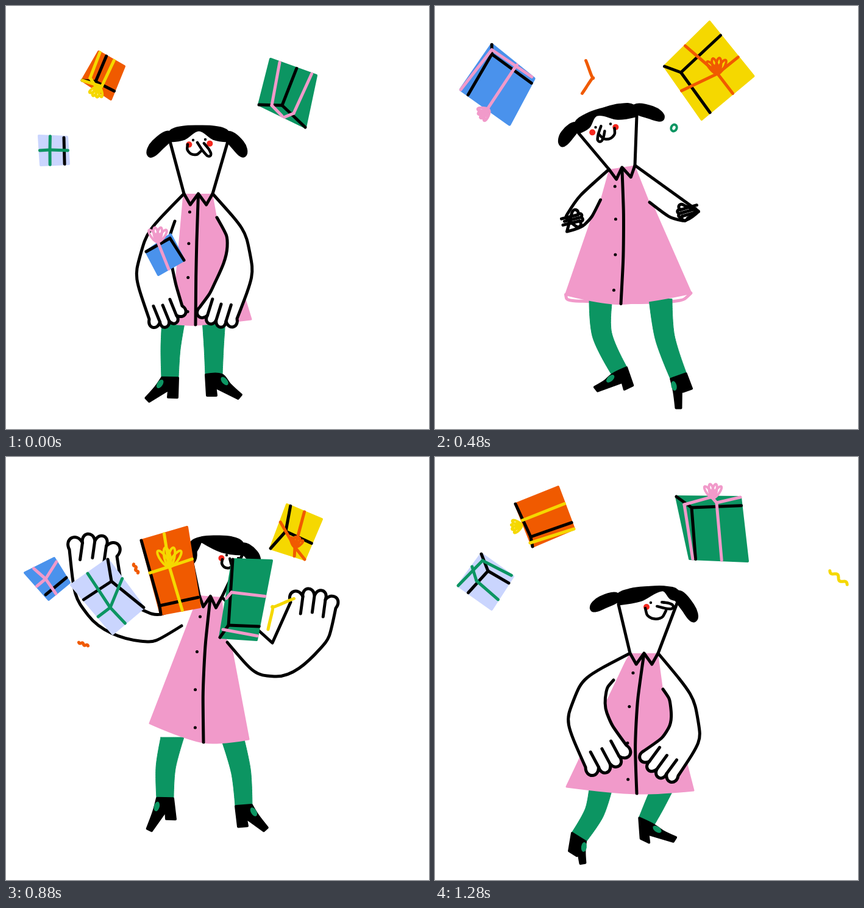
These frames come from a looping animation (694 by 694 pixels, 1360 ms). An HTML page with a canvas:

```html
<!DOCTYPE html>
<html lang="en">
<head>
<meta charset="utf-8">
<title>Juggling presents</title>
<style>
html, body { margin: 0; width: 100%; height: 100%; overflow: hidden; background: #fff; }
canvas { display: block; width: 100vw; height: 100vh; }
</style>
</head>
<body>
<canvas id="stage" width="694" height="694"></canvas>
<script>
const ctx = document.getElementById('stage').getContext('2d');
const LOOP = 1360, STEP = 80;
const BLACK = '#000', WHITE = '#fff', PINK = '#f19aca', GREEN = '#0c9562', BLUE = '#4a92ec';
const YELLOW = '#f5d800', ORANGE = '#f05a00', LILAC = '#cad5fe', RED = '#f5281e';
const SMOOTH = -2, SOFT = .4, STRAIGHT = 2;

// Points are [x, y] pairs.
const lerp = (a, b, u) => a + (b - a) * u;
const mix = (a, b, u) => a.map((v, i) => lerp(v, b[i], u));
const move = ([x, y], [dx, dy], k = 1) => [x + dx * k, y + dy * k];
const minus = (a, b) => [a[0] - b[0], a[1] - b[1]];
const dot = (a, b) => a[0] * b[0] + a[1] * b[1];
const unit = v => { const n = Math.hypot(...v) || 1; return [v[0] / n, v[1] / n]; };
const left = ([x, y]) => [-y, x];
const pairs = list => list.flatMap((v, i) => i % 2 ? [] : [[v, list[i + 1]]]);

// Appends a curve; turns sharper than `bend` (a cosine) stay corners.
function addCurve(path, p, bend, closed = false, joined = false) {
  const n = p.length, at = i => p[(i + n) % n];
  const isEnd = i => !closed && (i === 0 || i === n - 1);
  const heading = i => {
    if (isEnd(i)) return [0, 0];
    const u = unit(minus(at(i), at(i - 1))), v = unit(minus(at(i + 1), at(i)));
    return dot(u, v) < bend ? [0, 0] : unit(minus(at(i + 1), at(i - 1)));
  };
  if (joined) path.lineTo(...p[0]); else path.moveTo(...p[0]);
  for (let i = 0; i < n - (closed ? 0 : 1); i++) {
    const a = at(i), b = at(i + 1), j = (i + 1) % n;
    const reach = Math.hypot(...minus(b, a)) / 3;
    let c = move(a, heading(i), reach), d = move(b, heading(j), -reach);
    if (isEnd(i)) c = d;
    else if (isEnd(j)) d = c;
    path.bezierCurveTo(...c, ...d, ...b);
  }
  if (closed) path.closePath();
  return path;
}

function paintLine(path, color, width) {
  ctx.strokeStyle = color;
  ctx.lineWidth = width;
  ctx.stroke(path);
}
const line = (p, color = BLACK, width = 5, bend = SOFT) =>
  paintLine(addCurve(new Path2D(), p, bend), color, width);

function shape(p, color, bend = SOFT, round = 3) {
  const path = addCurve(new Path2D(), p, bend, true);
  ctx.fillStyle = color;
  ctx.fill(path);
  if (round) paintLine(path, color, round);
}

function oval([x, y], rx, ry, turn, color) {
  ctx.fillStyle = color;
  ctx.beginPath();
  ctx.ellipse(x, y, rx, ry, turn, 0, 7);
  ctx.fill();
}

// dress: neck left, neck right, hem left, hem right, placket end, placket bend, hem loop
// head: fringe corners, tail tips, eyes, mouth ends, nose tip, hair height, parting
// arm: elbow, first and last finger root, bulge, two points back, armpit
// leg: hip x, knee bend, ankle, toe, heel
const poses = [];
const pose = (time, dress, head, armL, armR, legL, legR) =>
  poses.push({ time, dress, head, armL, armR, legL, legR });

pose(0,
  [292,308, 339,308, 273,521, 402,514, 311,523, -1, 0],
  [269,222, 364,222, 234,246, 392,246, 307,220, 327,219, 298,227, 320,238, 335,246, 25, .5],
  [220,410, 235,514, 289,492, 15, 275,440, 268,390, 277,353],
  [400,405, 379,513, 318,494, 13, 340,460, 363,395, 346,347],
  [275, -2, 269,610, 229,649, 274,642], [341, 0, 341,605, 387,644, 337,639]);
pose(160,
  [272,234, 316,226, 238,438, 385,441, 296,448, 0, 0],
  [226,172, 326,150, 224,208, 340,163, 241,164, 262,155, 258,168, 276,161, 249,187, 36, .2],
  [205,310, 128,294, 93,350, 12, 125,371, 220,352, 255,302],
  [437,288, 454,243, 524,258, 18, 490,330, 425,356, 342,288],
  [262, -14, 283,568, 258,626, 302,592], [349, -3, 371,587, 374,638, 384,604]);
pose(320,
  [281,236, 324,228, 222,438, 407,430, 293,442, 9, 1],
  [214,197, 307,143, 203,239, 347,154, 238,176, 258,165, 252,190, 271,170, 248,199, 30, .25],
  [220,298, 219,232, 147,222, 12, 163,325, 225,347, 273,290],
  [437,273, 420,212, 470,200, 10, 484,265, 435,326, 352,293],
  [278, -19, 298,596, 256,625, 313,619], [366, -8, 398,599, 398,655, 414,620]);
pose(640,
  [290,300, 332,295, 207,509, 433,512, 317,535, -2, 0],
  [257,220, 355,218, 210,219, 403,215, 289,222, 318,222, 288,233, 318,231, 291,246, 25, .5],
  [214,385, 240,488, 302,457, 14, 270,415, 266,370, 270,346],
  [427,400, 409,484, 347,454, 12, 380,410, 376,378, 352,351],
  [266, -7, 307,602, 266,637, 323,632], [374, -7, 401,616, 401,673, 415,640]);
pose(880,
  [317,227, 354,230, 236,437, 398,463, 324,468, -5, 0],
  [303,160, 388,160, 305,174, 414,177, 362,161, 381,166, 355,168, 372,178, 378,186, 30, .2],
  [222,250, 182,163, 104,152, 20, 135,260, 220,302, 288,277],
  [437,305, 467,238, 541,248, 16, 515,315, 440,360, 363,304],
  [273, -5, 261,560, 233,616, 271,594], [371, 5, 390,572, 429,614, 388,606]);
pose(1040,
  [320,255, 366,257, 217,464, 417,482, 340,474, -4, 0],
  [311,182, 404,195, 272,138, 438,214, 356,189, 380,191, 353,197, 380,205, 394,202, 30, .65],
  [236,264, 245,160, 175,148, 12, 176,275, 220,320, 289,312],
  [436,345, 453,267, 528,268, 16, 515,345, 460,399, 382,336],
  [265, -7, 238,621, 250,665, 232,645], [380, 15, 361,593, 392,629, 348,612]);
pose(1280,
  [320,322, 366,322, 216,541, 424,547, 331,552, -7, 0],
  [301,242, 399,235, 256,250, 427,269, 354,239, 376,239, 345,248, 379,252, 391,246, 25, .75],
  [227,400, 247,509, 314,473, 14, 282,420, 281,385, 293,366],
  [432,435, 399,523, 343,482, 12, 383,445, 386,405, 374,381],
  [272, 7, 236,624, 243,670, 226,650], [373, 0, 347,598, 397,630, 344,629]);

function bodyAt(t) {
  const i = poses.findLastIndex(p => p.time <= t);
  const a = poses[i], b = poses[(i + 1) % poses.length];
  const u = (t - a.time) / ((b.time || LOOP) - a.time), body = {};
  for (const k in a) if (k !== 'time') body[k] = mix(a[k], b[k], u);
  return body;
}

function drawArm(shoulder, data, side) {
  const [elbow, first, last] = pairs(data.slice(0, 6)), back = pairs(data.slice(7));
  const across = minus(last, first), out = unit(left(across)).map(v => v * side);
  const root = i => move(mix(first, last, i / 4), out, data[6] * Math.sin(Math.PI * i / 4));
  const path = addCurve(new Path2D(), [shoulder, elbow, first], 0);
  for (let i = 0; i < 4; i++) {
    const a = root(i), b = root(i + 1), tip = left(minus(b, a));
    path.bezierCurveTo(...move(a, tip, .85 * side), ...move(b, tip, .85 * side), ...b);
  }
  addCurve(path, [last, ...back], 0, false, true);
  ctx.fillStyle = WHITE;
  ctx.fill(path);
  paintLine(path, BLACK, 5);
  for (let i = 1; i < 4; i++) line([root(i), move(root(i), out, -28)]);
}

function drawLeg([hipX, bend, ...rest], hipY) {
  const [ankle, toe, heel] = pairs(rest), hip = [hipX, hipY];
  const knee = move(mix(hip, ankle, .5), [bend, 0]);
  const wide = left(unit(minus(ankle, knee)));
  const slant = left(unit(minus(ankle, hip)));
  shape([move(hip, [-19, 0]), move(knee, slant, 16), move(ankle, wide, 14),
    move(ankle, wide, -14), move(knee, slant, -16), move(hip, [19, 0])], GREEN, SOFT, 1);

  const front = dot(minus(toe, heel), wide) > 0 ? wide : minus([0, 0], wide);
  let top = left(unit(minus(toe, ankle)));
  if (dot(top, front) < 0) top = minus([0, 0], top);
  const tip = mix(toe, ankle, .08), inner = move(heel, front, 8);
  const frontAnkle = move(ankle, front, 13), arch = mix(inner, ankle, .4);
  const instep = mix(frontAnkle, toe, .4);
  shape([frontAnkle, instep, move(tip, top, 4), move(tip, top, -4), arch, inner,
    move(heel, front, -7), move(ankle, front, -13)], BLACK, .6, 4);
  const along = minus(toe, frontAnkle);
  oval(mix(mix(frontAnkle, toe, .22), arch, .15), 8, 4.5, Math.atan2(along[1], along[0]), GREEN);
}

function drawDress([neckL, neckR, hemL, hemR, end], bend) {
  shape([neckL, neckR, hemR, end, hemL], PINK, .5, 3);
  const top = mix(neckL, neckR, .5);
  const middle = move(mix(top, end, .5), [bend, 0]);
  line([top, middle, end]);
  for (const u of [.14, .38, .64, .9]) {
    const sway = bend * 4 * u * (1 - u);
    oval(move(mix(top, end, u), [sway - 13, 0]), 2.5, 2.5, 0, BLACK);
  }
}

function drawHemLoop(hemL, hemR, drop) {
  const d = 24 * drop;
  const hem = [hemL, move(hemL, [4, d * .7]), move(hemL, [28, d * .9]),
    move(mix(hemL, hemR, .6), [0, d * 1.2]), move(hemR, [-18, d]), hemR];
  shape(hem, WHITE, SMOOTH, 0);
  line(hem, PINK, 5, SMOOTH);
}

function drawTail(root, tip) {
  let side = left(unit(minus(tip, root)));
  if (side[1] > 0) side = minus([0, 0], side);
  const middle = mix(root, tip, .58);
  shape([root, move(middle, side, 12), tip, move(middle, side, -7)], BLACK, SMOOTH);
}

function drawHead(data, neckL, neckR) {
  const [cornerL, cornerR, tailL, tailR, eyeL, eyeR, mouthL, mouthR, nose] = pairs(data);
  const [height, part] = data.slice(18);
  shape([cornerL, neckL, neckR, cornerR], WHITE, STRAIGHT, 0);
  line([cornerL, neckL]);
  line([cornerR, neckR]);

  const collar = (u, d) => move(mix(neckL, neckR, u), left(unit(minus(neckR, neckL))), d);
  line([neckL, collar(.22, 18), collar(.5, 0), collar(.78, 18), neckR], BLACK, 5, STRAIGHT);

  const axis = unit(minus(eyeR, eyeL)), down = left(axis);
  oval(move(move(eyeL, axis, -7), down, 7), 5, 5, 0, RED);
  if (nose[0] - eyeR[0] < 10) oval(move(move(eyeR, axis, 7), down, 7), 5, 5, 0, RED);
  for (const eye of [eyeL, eyeR]) oval(eye, 2.2, 2.2, 0, BLACK);

  const smile = minus(mouthR, mouthL);
  line([mouthL, move(mix(mouthL, mouthR, .25), left(smile), .4),
    move(mix(mouthL, mouthR, .75), left(smile), .4), mouthR], BLACK, 4.5, SMOOTH);
  const bridge = move(mix(eyeL, eyeR, .5), down, 2), wide = left(unit(minus(nose, bridge)));
  line([move(bridge, wide, 4), move(mix(bridge, nose, .85), wide, 4), nose,
    move(mix(bridge, nose, .85), wide, -4), move(mix(bridge, nose, .25), wide, -4)], BLACK, 4.5, SMOOTH);

  const up = left(unit(minus(cornerL, cornerR)));
  const hair = (u, h) => move(mix(cornerL, cornerR, u), up, h * height);
  drawTail(hair(.03, .55), tailL);
  drawTail(hair(.97, .55), tailR);
  shape([hair(0, 0), hair(0, .65), hair(.22, .95), hair(.5, 1), hair(.78, .95), hair(1, .65),
    hair(1, 0), hair((1 + part) / 2, .15), hair(part, .72), hair(part / 2, .15)], BLACK, .3);
}

function drawBody(b) {
  const dress = pairs(b.dress.slice(0, 10)), [neckL, neckR, hemL, hemR, end] = dress;
  const [bend, drop] = b.dress.slice(10);
  if (drop > .05) drawHemLoop(hemL, hemR, drop);
  drawLeg(b.legL, end[1] - 8);
  drawLeg(b.legR, end[1] - 8);
  drawDress(dress, bend);
  drawArm(neckL, b.armL, 1);
  drawArm(neckR, b.armR, -1);
  drawHead(b.head, neckL, neckR);
}

// A gift view is a box of four corners with folds, ribbons and a bow.
// Folds and ribbons are [x, y, ...ends], each end a place along the rim from 0 to 4.
// A bow is [degrees, size] and its place, by default the first ribbon's point.
const gifts = [];
function gift(color, trim, born, gone) {
  const item = { color, trim, born, gone, views: [] };
  gifts.push(item);
  return (time, box, folds, ribbons, bow) => {
    const corners = pairs(box), [xs, ys] = [0, 1].map(k => corners.map(c => c[k]));
    const low = [Math.min(...xs), Math.min(...ys)], high = [Math.max(...xs), Math.max(...ys)];
    item.views.push({ time, corners, folds, ribbons, bow,
      mid: mix(low, high, .5), size: Math.hypot(...minus(high, low)) });
  };
}

let view = gift(BLUE, PINK, 0, 1120);
view(0, [230,403, 270,375, 292,417, 250,441], [[269,381, 0, 2]], [[249,387, 2.6]], [-90, 24]);
view(160, [172,293, 225,265, 272,377, 230,402], [[223,312, 1, 2, 3.6]], [[202,293, 3.9, 1.4, 2.6]], [-110, 28]);
view(320, [54,158, 117,86, 200,160, 121,235], [[130,120, 1, 2.1, 3.9]], [[88,128, 0, 1, 2.6], [118,97, 1.95]], [-115, 30]);
view(640, [70,107, 127,153, 94,215, 28,168], [[70,120, 0, 1.1, 2.85]], [[70,114, 3, .95], [100,140, .6, 2.45]], [150, 15, 66,196]);
view(880, [31,190, 79,166, 104,206, 70,234], [[65,226, 1.8]], [[65,200, .3, 2.65, 3.5, 1.15]]);
view(1040, [43,194, 71,191, 73,224, 46,229], [[66,211, 1, 1.6, 3.5]], [[58,212, .5, 2.5, 3.4]]);

view = gift(YELLOW, ORANGE, 80, 1120);
view(160, [385,235, 448,248, 403,390, 327,379], [[384,268, 0, 3, 1.2]], [[386,328, .47, 2.57, 3.55, 1.65]], [90, 24]);
view(320, [361,153, 460,72, 505,182, 420,234], [[441,104, 0, 1, 2]], [[431,172, .5, 2.55, 1.35, 3.42]], [90, 30]);
view(640, [393,116, 467,43, 539,132, 454,203], [[420,126, 0, 1.25, 2.84]], [[480,128, .46, 2.4, 1.65, 3.54]], [-95, 26]);
view(880, [461,78, 518,102, 490,168, 434,150], [[459,122, .1, 1.6, 3]], [[474,148, .5, 2.3, 3.6, 2]], [-75, 17]);
view(1040, [470,100, 494,97, 499,138, 467,140], [[468,121, 1.4]], [[468,131, 1.7]]);

view = gift(ORANGE, YELLOW, 800, 1600);
view(880, [222,137, 297,115, 318,246, 254,258], [[252,244, 0, 1.88, 3]], [[268,180, .5, 2.45, 1.4, 3.56]], [-90, 32]);
view(1040, [156,77, 214,21, 283,97, 215,143], [[186,92, 1.45, 3, 0]], [[190,63, 3.85, 1.2, 2.45]], [-110, 28]);
view(1280, [132,77, 202,49, 228,118, 160,147], [[157,131, 0, 1.85, 3]], [[143,104, 1.4], [156,141, 2]], [170, 17, 142,112]);
view(1360, [152,75, 194,99, 172,153, 125,122], [[147,124, .3, 1.75, 3]], [[138,118, .05, 2.4], [157,132, .6, 3]], [110, 18, 152,132]);
view(1520, [135,102, 175,105, 176,145, 141,145], [[147,138, .4, 1.85]], [[162,144, .7], [142,142, 0]], [100, 11]);

view = gift(GREEN, PINK, 800, 1600);
view(880, [372,168, 436,170, 411,300, 351,296], [[365,276, 0, 1.83, 3]], [[370,222, 3.5, 1.45], [356,283, 1.95]]);
view(1040, [388,64, 474,93, 446,185, 361,164], [[391,96, 0, 3, 1.3]], [[388,81, 1.1], [371,121, 1.7]], [-120, 28, 372,112]);
view(1280, [396,65, 501,66, 513,171, 418,167], [[421,83, 0, 1.13, 2.9]], [[409,78, 2.95, .55], [462,75, .55, 1, 2.45]], [-90, 23, 456,67]);
view(1360, [434,87, 509,114, 491,199, 415,162], [[453,163, .57, 2, 3]], [[436,163, .2, 2.5], [472,176, .9, 2.45]]);
view(1520, [474,107, 521,147, 481,189, 434,155], [[480,177, 3, 1, 2]], [[462,158, .5, 2.5]]);

view = gift(LILAC, GREEN, 800, 1600);
view(880, [167,168, 226,247, 175,290, 107,210], [[173,204, 0, 1, 2.7]], [[171,247, 3.45, 1.6, .4, 2.35]]);
view(1040, [76,95, 165,112, 161,204, 60,185], [[146,116, 3.9, 2.2, 1]], [[100,155, .4, 2.65, 3.45, 1.45]]);
view(1280, [76,159, 128,196, 93,250, 38,211], [[87,187, 0, 1.2, 2.7]], [[78,170, 3, .95], [68,203, 3.6, 1.7]]);
view(1360, [54,213, 100,215, 103,259, 57,261], [[95,216, 2.15]], [[72,236, .4, 2.67, 1.5, 3.5]]);
view(1520, [70,255, 95,252, 88,280, 66,270], [[78,266, .2, 1.4, 3]], [[79,266, .8, 2.4, 3.3]]);

function drawBow([degrees, size, ...place], fallback, color) {
  const at = place.length ? place : fallback, half = size / 2;
  for (let i = -1.5; i < 2; i++) {
    const a = degrees * Math.PI / 180 + i * .42, path = new Path2D();
    path.ellipse(...move(at, [Math.cos(a), Math.sin(a)], half), half, size * .16, a, 0, 7);
    paintLine(path, color, 4);
  }
}

// Views around time t; outside the listed times a gift grows or shrinks.
function around(views, t) {
  const first = views[0], last = views[views.length - 1];
  const a = views.findLast(v => v.time <= t) ||
    { ...first, time: first.time - 160, mid: move(mix(first.mid, [320, first.mid[1]], .5), [0, 80]), size: first.size * .4 };
  const b = views.find(v => v.time > t) ||
    { ...last, time: last.time + 160, mid: move(last.mid, [0, 20]), size: last.size * .4 };
  const u = (t - a.time) / (b.time - a.time);
  return { a, b, u, near: t < first.time ? first : t > last.time ? last : u < .5 ? a : b };
}

function drawGift({ color, trim, born, gone, views }, clock) {
  const t = clock < born ? clock + LOOP : clock;
  if (t >= gone) return;
  const { a, b, u, near } = around(views, t), { corners, mid, folds, ribbons, bow } = near;
  const lift = .4 * u * (1 - u) * (b.time - a.time), scale = lerp(a.size, b.size, u) / near.size;
  const rim = e => mix(corners[Math.floor(e) % 4], corners[(Math.floor(e) + 1) % 4], e % 1);
  const strips = (list, ink) => {
    for (const [x, y, ...ends] of list) for (const e of ends) line([[x, y], rim(e)], ink, 5 / scale);
  };
  ctx.save();
  ctx.translate(...move(mix(a.mid, b.mid, u), [0, -lift]));
  ctx.scale(scale, scale);
  ctx.translate(-mid[0], -mid[1]);
  shape(corners, color, STRAIGHT, 4);
  strips(folds, BLACK);
  strips(ribbons, trim);
  if (bow) drawBow(bow, ribbons[0].slice(0, 2), trim);
  ctx.restore();
}

// Confetti keys: time, x, y, degrees, half length, curl.
const confetti = [];
const bit = (color, gone, ...keys) => confetti.push({ color, gone, keys });
bit(ORANGE, 720, [160, 264,293, 56, 29, 1], [320, 233,196, 75, 34, 1], [640, 265,38, 118, 20, 1]);
bit(YELLOW, 1360, [880, 447,254, -50, 33, 1], [1040, 538,182, -9, 36, 0], [1280, 662,198, 41, 18, 0]);
bit(ORANGE, 1120, [880, 213,183, 67, 8, 0], [1040, 181,117, 60, 4, 0]);
bit(ORANGE, 1120, [880, 127,307, 23, 8, 0], [1040, 60,309, -8, 4, 0]);
const ring = { gone: 720, keys: [[160, 314,357], [320, 337,273], [640, 447,127]] };

function keyAt({ keys, gone }, t) {
  if (t < keys[0][0] - STEP || t >= gone) return null;
  const i = Math.min(Math.max(keys.findLastIndex(k => k[0] <= t), 0), keys.length - 2);
  const a = keys[i], b = keys[i + 1];
  return mix(a, b, (t - a[0]) / (b[0] - a[0]));
}

function drawBit(item, t) {
  const key = keyAt(item, t);
  if (!key) return;
  const [, x, y, degrees, half, curl] = key, k = half / 30, path = new Path2D();
  ctx.save();
  ctx.translate(x, y);
  ctx.rotate(degrees * Math.PI / 180);
  for (let s = -1; s <= 1.01; s += .05) {
    const along = 30 * s - curl * 16 * Math.sin(2.5 * s) * (1 - Math.abs(s));
    const wave = (1 - curl) * 5 * Math.sin(6 * s) - curl * 12 * Math.cos(2 * s);
    path.lineTo(along * k, wave * k);
  }
  paintLine(path, item.color, 5);
  ctx.restore();
}

function drawRing(t) {
  const key = keyAt(ring, t);
  if (!key) return;
  const path = new Path2D();
  path.ellipse(key[1], key[2], 4.5, 5.5, .4, 0, 7);
  paintLine(path, GREEN, 4);
}

function draw(now) {
  const t = Math.floor(now % LOOP / STEP) * STEP;
  ctx.fillStyle = WHITE;
  ctx.fillRect(0, 0, 694, 694);
  ctx.lineCap = ctx.lineJoin = 'round';
  drawBody(bodyAt(t));
  for (const g of gifts) drawGift(g, t);
  for (const c of confetti) drawBit(c, t);
  drawRing(t);
}

const start = performance.now();
(function tick() {
  draw(performance.now() - start);
  requestAnimationFrame(tick);
})();
</script>
</body>
</html>
```
